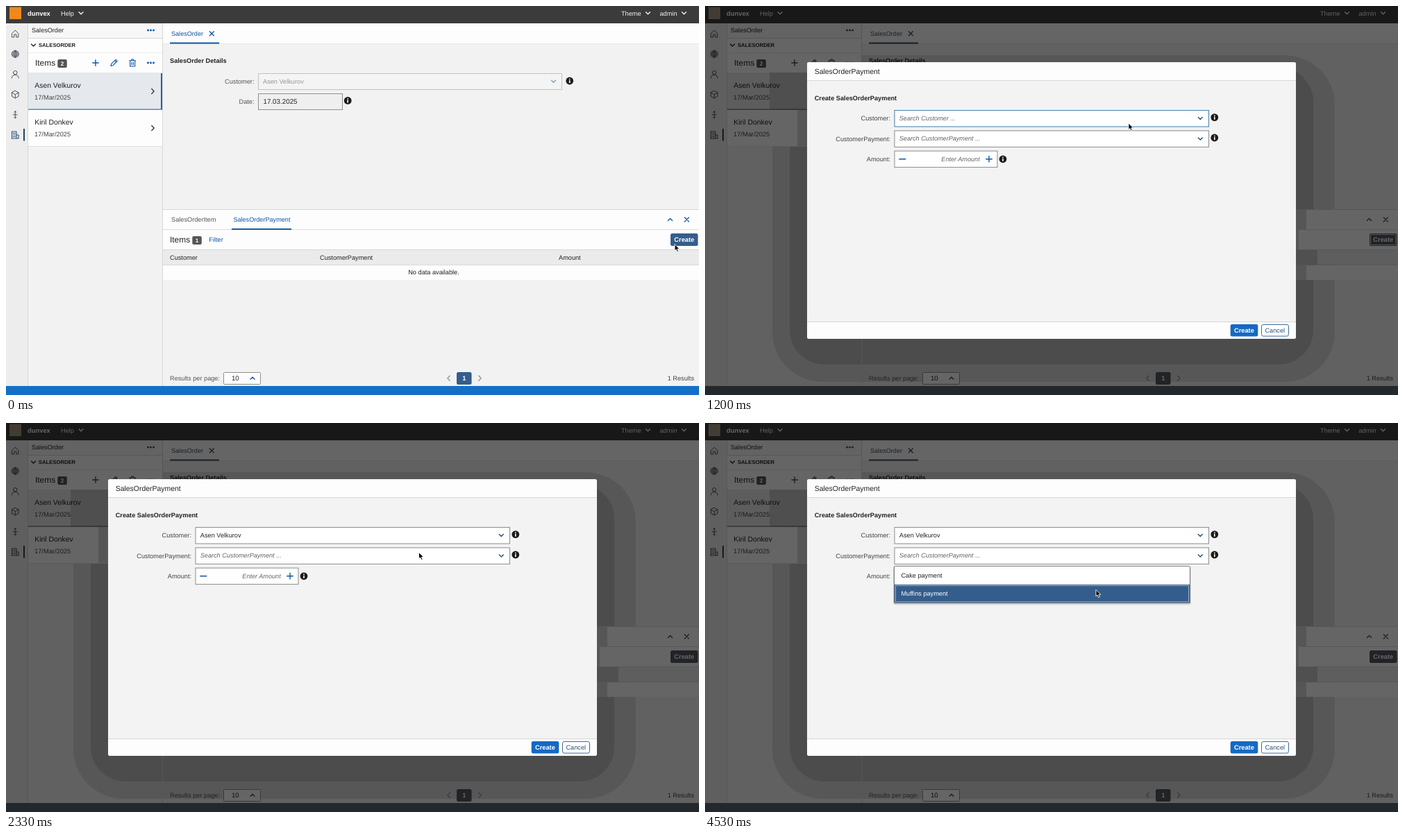
An HTML page for the animation above (4600 ms loop, 998 by 561 pixels).

```html
<!DOCTYPE html>
<html lang="en">
<head>
<meta charset="utf-8">
<title>Sales order payment</title>
<style>
html, body { margin: 0; width: 100%; height: 100%; overflow: hidden; background: #f2f2f2; }
svg { display: block; width: 100vw; height: 100vh; }
text { font-family: "Liberation Sans", Arial, sans-serif; font-size: 9.2px; text-rendering: geometricPrecision; white-space: pre; }
.dim { filter: grayscale(.85) brightness(.4); }
</style>
</head>
<body>
<svg id="stage" viewBox="0 0 998 561" xmlns="http://www.w3.org/2000/svg"></svg>
<script>
const PERSON = 'Asen Velkurov', OTHER = 'Kiril Donkev', DATE = '17/Mar/2025';
const BLUE = '#0f55a5', NAVY = '#355d8b', INK = '#222', WHITE = '#fdfdfd', LINE = '#d7d7d7';
const LOOP = 4600;

// Markup helpers
const rect = (x, y, w, h, fill, more = '') =>
  `<rect x="${x}" y="${y}" width="${w}" height="${h}" fill="${fill}" ${more}/>`;
const frame = (x, y, w, h, fill, stroke, more = '') =>
  rect(x + .5, y + .5, w - 1, h - 1, fill, `stroke="${stroke}" ${more}`);
const text = (x, y, s, fill = INK, size = 9.2, more = '') =>
  `<text x="${x}" y="${y}" fill="${fill}" style="font-size:${size}px" ${more}>${s}</text>`;
const bold = (x, y, s, fill, size, more = '') => text(x, y, s, fill, size, 'font-weight="700" ' + more);
const path = (d, color, w = 1.2, x = 0, y = 0) =>
  `<path d="${d}" transform="translate(${x} ${y})" fill="none" stroke="${color}" stroke-width="${w}" stroke-linecap="round" stroke-linejoin="round"/>`;
const group = (id, s, more = '') => `<g id="${id}" ${more}>${s}</g>`;
const END = 'text-anchor="end"', MID = 'text-anchor="middle"', ITALIC = 'font-style="italic"';

const down = (x, y, c, r = 3) => path(`M${-r} ${-r / 2}L0 ${r / 2}L${r} ${-r / 2}`, c, 1.4, x, y);
const up = (x, y, c, r = 3) => path(`M${-r} ${r / 2}L0 ${-r / 2}L${r} ${r / 2}`, c, 1.4, x, y);
const right = (x, y, c) => path('M-1.7 -3.5L1.7 0L-1.7 3.5', c, 1.3, x, y);
const left = (x, y, c) => path('M1.7 -3.5L-1.7 0L1.7 3.5', c, 1.3, x, y);
const cross = (x, y) => path('M-3 -3L3 3M3 -3L-3 3', BLUE, 1.3, x, y);
const plus = (x, y, r) => path(`M${-r} 0H${r}M0 ${-r}V${r}`, BLUE, 1.4, x, y);
const dots = (x, y) => [-4, 0, 4].map(d => `<circle cx="${x + d}" cy="${y}" r="1.45" fill="${BLUE}"/>`).join('');
const info = (x, y) => `<circle cx="${x}" cy="${y}" r="5.4" fill="#1c1c1c"/>` +
  rect(x - .8, y - .9, 1.6, 4, '#fff') + rect(x - .8, y - 3.3, 1.6, 1.5, '#fff');
const badge = (x, y, n) => rect(x, y, 13.5, 12, '#555', 'rx="2"') +
  bold(x + 6.7, y + 9, n, '#fff', 8.2, MID);

function topBar() {
  const c = '#f2f2f2';
  return rect(0, 0, 998, 25, '#3b3b3b') + rect(5, 1.5, 17, 17.5, '#ee8a1d') +
    bold(31, 13.5, 'dunvex', '#fff', 9.4) +
    text(79, 13.5, 'Help', c) + down(108, 10.3, c) +
    text(886, 13.5, 'Theme', c) + down(924.5, 10.3, c) +
    text(941.5, 13.5, 'admin', c) + down(976.5, 10.3, c);
}

function sideBar() {
  const c = '#475360';
  const icons = [
    'M-4.5 -.5L0 -5L4.5 -.5V5H1.5V1H-1.5V5H-4.5Z',
    'M-5 0A5 5 0 1 0 5 0A5 5 0 1 0 -5 0M-5 0H5M0 -5V5M-4.2 -2.5H4.2M-4.2 2.5H4.2M0 -5Q-5 0 0 5Q5 0 0 -5',
    'M-2.7 -2.3A2.7 2.7 0 1 0 2.7 -2.3A2.7 2.7 0 1 0 -2.7 -2.3M-5 5.5Q-4.5 1 0 1Q4.5 1 5 5.5',
    'M0 -5.3L4.8 -2.7V2.7L0 5.3L-4.8 2.7V-2.7ZM-4.8 -2.7L0 0L4.8 -2.7M0 0V5.3',
    'M0 -5V5M-1.6 -3.6L0 -5.2L1.6 -3.6M-1.6 3.6L0 5.2L1.6 3.6M-3 0H3'
  ];
  return rect(0, 25, 31, 523, '#ededed') + rect(31, 25, 1, 523, LINE) +
    icons.map((d, i) => path(d, c, 1, 13.3, 40 + i * 29.2)).join('') +
    path('M-4.5 5V-5H2V5M-5 5H5V0H2M-2.7 -2.5H.3M-2.7 0H.3M-2.7 2.5H.3', '#24507f', 1.1, 13, 186) +
    rect(25, 177, 2, 17.5, '#2b4157');
}

function listPanel() {
  const row = (y, name) => text(41.3, y, name, INK, 10.4) + text(41, y + 17.5, DATE, '#444', 9.3);
  return rect(32, 25, 193, 21, '#f7f7f7') + rect(32, 46, 193, 21, WHITE) +
    text(37, 38.3, 'SalesOrder', INK, 9.1) + dots(208.5, 35) +
    rect(32, 46, 193, 1, LINE) + rect(32, 67, 193, 29, WHITE) + rect(32, 67, 193, .7, '#e4e4e4') +
    down(39.5, 56.5, INK) + bold(47, 59.3, 'SALESORDER', INK, 7.65) +
    rect(32, 96, 193, 53, '#e5e8ec') + rect(32, 150, 193, 52, WHITE) + rect(32, 202, 193, 1, '#e0e0e0') +
    group('rowBands', rect(93, 96, 54, 53, '#000') + rect(133, 150, 14, 52, '#000'), 'opacity=".14"') +
    rect(32, 148.5, 193, 1.2, '#3f6fb0') + rect(223, 97, 2, 52, '#2d5f9f') +
    text(42, 86, 'Items', INK, 11.9) + badge(74.3, 77, 2) + plus(129, 82, 4.2) +
    path('M-4.5 4.5L-3.7 1.3L2.5 -4.7L4.7 -2.5L-1.5 3.7ZM1 -3.3L3.2 -1.1', BLUE, 1.1, 155.5, 82) +
    path('M-4.5 -3.2H4.5M-1.5 -3.2V-5H1.5V-3.2M-3.5 -3.2V5H3.5V-3.2M-1.2 -.8V2.8M1.2 -.8V2.8', BLUE, 1.1, 182.2, 82) +
    dots(208.5, 82) + row(117.6, PERSON) + right(211.5, 123, '#333') +
    row(170.8, OTHER) + right(211.5, 176, '#333') + rect(225, 25, 1, 523, LINE);
}

function details() {
  return rect(226, 25, 772, 29, WHITE) + rect(226, 54, 772, .7, '#e4e4e4') +
    text(238, 42.8, 'SalesOrder', BLUE, 9.1) + cross(296.3, 39.7) + rect(236, 52.5, 71, 2, BLUE) +
    bold(236, 82.3, 'SalesOrder Details') +
    text(357.5, 111.6, 'Customer:', '#555', 9.2, END) + frame(363, 97, 438, 24, '#f4f4f4', '#c2c2c2') +
    text(370, 111.8, PERSON, '#969696') + down(788.5, 108.7, '#7f9dbb') + info(811.7, 108) +
    text(357.5, 141, 'Date:', '#555', 9.2, END) + frame(363, 126, 122, 24, '#efefef', '#8f8f8f') +
    text(370.5, 141.3, '17.03.2025', INK, 9.8) + info(492.2, 136.4);
}

function payments() {
  return rect(226, 293, 772, 1, LINE) + rect(226, 294, 772, 57, WHITE) + rect(226, 322, 772, 1, '#dcdcdc') +
    rect(226, 351, 772, 22, '#ebebeb') + rect(226, 351, 772, .8, '#d4d4d4') +
    rect(226, 373, 772, .8, '#d4d4d4') + rect(226, 374, 772, 21, WHITE) +
    group('tableBands', rect(851, 294, 15, 28, '#000') + rect(851, 323, 4, 28, '#000') +
      rect(851, 352, 31, 21, '#000') + rect(851, 374, 15, 21, '#000'), 'opacity=".14"') +
    text(238, 311.2, 'SalesOrderItem', '#555') + text(327.4, 311.2, 'SalesOrderPayment', BLUE, 9.12) +
    rect(325, 320.8, 86, 2, BLUE) + up(956.5, 308, BLUE) + cross(980.3, 308) +
    text(236, 341.2, 'Items', INK, 11.9) + badge(268.3, 332, 1) + text(292.3, 340, 'Filter', BLUE) +
    rect(957, 328, 39.5, 18, NAVY, 'rx="2.5"') +
    group('focusRing', frame(958, 329, 37.5, 16, 'none', '#fff', 'rx="1.5" stroke-width=".8"')) +
    bold(976.8, 340.3, 'Create', '#fff', 9.3, MID) +
    text(236, 365.8, 'Customer') + text(452, 365.8, 'CustomerPayment') + text(796, 365.8, 'Amount') +
    text(616, 387, 'No data available.', INK, 9.2, MID) +
    text(236, 540, 'Results per page:', '#555') + frame(313, 528, 54, 18, WHITE, '#8f8f8f', 'rx="1"') +
    text(325, 540.2, '10', INK, 9.6) + up(355, 536.8, BLUE) +
    left(637.5, 536.8, '#8a94a0') + rect(649, 528, 21.5, 18, NAVY, 'rx="2.5"') +
    bold(659.8, 540.2, '1', '#fff', 9.3, MID) + right(682.5, 536.8, '#8a94a0') +
    text(991, 540, '1 Results', '#444', 9.2, END) + rect(0, 548, 998, 13, '#1470c6');
}

function page() {
  const shade = rect(97, 71, 810, 471, '#000', 'rx="72" opacity=".1"') +
    rect(122, 88, 754, 429, '#000', 'rx="50" opacity=".13"');
  return rect(0, 0, 998, 561, '#f2f2f2') + sideBar() + group('bands', shade) +
    listPanel() + details() + payments() + topBar();
}

function dialog() {
  const box = (id, x, y, w, h) => frame(x, y, w, h, '#fff', '#8c8c8c', `id="${id}"`);
  const label = (y, s) => text(267, y, s, '#444', 9.2, END);
  const hint = (id, x, y, s, more = '') => text(x, y, s, '#5f6468', 9.12, `id="${id}" ${ITALIC} ${more}`);
  return rect(147, 81, 704, 399, '#f3f3f3', 'rx="3"') +
    `<path d="M147 107V84a3 3 0 0 1 3-3H848a3 3 0 0 1 3 3V107Z" fill="${WHITE}"/>` + rect(147, 107, 704, 1, LINE) +
    `<path d="M147 456V477a3 3 0 0 0 3 3H848a3 3 0 0 0 3-3V456Z" fill="${WHITE}"/>` + rect(147, 455, 704, 1, LINE) +
    text(157.7, 98.2, 'SalesOrderPayment', INK, 10.45) + bold(157.7, 136, 'Create SalesOrderPayment') +
    label(165.2, 'Customer:') + box('buyerBox', 272.5, 150, 453.5, 24.5) + info(733.8, 160.6) +
    hint('buyerHint', 279.8, 165, 'Search Customer ...') + text(279.8, 165, PERSON, INK, 9.2, 'id="buyer"') +
    down(713.3, 162, '#24507f') +
    label(194.5, 'CustomerPayment:') + box('payBox', 272.5, 179.4, 453.5, 24.5) + info(733.8, 190) +
    hint('payHint', 279.8, 194.4, 'Search CustomerPayment ...') + down(713.3, 191.4, '#24507f') +
    label(223.8, 'Amount:') + box('sumBox', 272.5, 208.6, 149, 24.5) + info(429, 220.8) +
    path('M-4.5 0H4.5', BLUE, 1.4, 284.3, 220.7) + plus(409, 220.7, 4.3) +
    hint('sumHint', 395.7, 223.8, 'Enter Amount', END) +
    rect(279.5, 156.5, .9, 11, '#111', 'id="buyerCaret"') + rect(279.5, 186, .9, 11, '#111', 'id="payCaret"') +
    rect(756.7, 459, 39.6, 17.6, '#1569c4', 'rx="2.5"') + bold(776.4, 471.2, 'Create', '#fff', 9.3, MID) +
    frame(801, 459, 40, 17.6, '#fff', '#3d6a99', 'rx="2.5"') + text(820.8, 471.2, 'Cancel', '#24507f', 9.2, MID);
}

const option = (id, y, s) => rect(272.5, y, 426, 26.6, '#fff', `id="${id}Back"`) +
  group(id + 'Ring', frame(274, y + 1, 423, 24.4, 'none', '#a9c4e2', 'stroke-width=".8"')) +
  text(282.4, y + 16.2, s, INK, 9.2, `id="${id}Text"`);
const menu = (id, y, h, body) => group(id,
  rect(271, y, 429, h + 3, '#000', 'rx="3" opacity=".1"') + rect(271.5, y - .5, 427.5, h + 1.7, '#000', 'rx="2.5" opacity=".16"') +
  body + frame(272, y - .5, 427, h + .8, 'none', '#75797d', 'rx="2"'));

document.getElementById('stage').innerHTML = group('page', page()) +
  group('dialog', dialog() +
    menu('buyerMenu', 177, 26.6, option('person', 177, PERSON)) +
    menu('payMenu', 206.4, 53.2, option('cake', 206.4, 'Cake payment') + option('muffin', 233, 'Muffins payment'))) +
  '<path id="cursor" d="M0 0V9.4L2.1 7.5L3.6 11L5.4 10.2L3.9 6.9L6.8 6.8Z" fill="#000" stroke="#fff" stroke-width=".9" stroke-linejoin="round"/>';

const $ = id => document.getElementById(id);
const show = (id, on) => { $(id).style.display = on ? '' : 'none'; };
const within = (t, a, b) => t >= a && t < b;

// Pointer stops: time, x, y
const track = [
  [0, 963, 343.5], [400, 963, 343], [600, 938.5, 336], [850, 780, 252], [1200, 610, 169],
  [1400, 595, 163.5], [1670, 595, 163.5], [2050, 594.5, 186.5], [2670, 594.5, 186.5],
  [3130, 570, 209.5], [3470, 562.3, 229], [3990, 562.3, 229], [4130, 562.3, 232], [4350, 563, 240.5], [LOOP, 563, 240.5]
];

function pointer(t) {
  const i = Math.max(1, track.findIndex(p => t < p[0]));
  const [a, b] = [track[i - 1], track[i]];
  const u = (t - a[0]) / (b[0] - a[0]);
  return [1, 2].map(k => a[k] + (b[k] - a[k]) * u);
}

function paintOption(id, hover, pressed) {
  $(id + 'Back').setAttribute('fill', pressed ? NAVY : hover ? '#e5e5e5' : '#fff');
  $(id + 'Text').setAttribute('fill', pressed ? '#fff' : INK);
  show(id + 'Ring', pressed);
}

function update(t) {
  const open = t >= 600;
  const [x, y] = pointer(t);
  $('cursor').setAttribute('transform', `translate(${x.toFixed(2)} ${y.toFixed(2)})`);
  $('page').setAttribute('class', open ? 'dim' : '');
  show('dialog', open);
  ['bands', 'rowBands', 'tableBands'].forEach(id => show(id, open));
  show('focusRing', within(t, 600, 1400));

  const picking = within(t, 1400, 2200), paying = t >= 2670;
  const blink = start => (t - start) % 1000 < 500;
  show('buyerMenu', picking);
  show('buyerCaret', picking && blink(1400));
  show('buyerHint', t < 2200);
  show('buyer', t >= 2200);
  const over = open && x < 725 && y > 150 && y < 174;
  $('buyerBox').setAttribute('stroke', over ? '#3f7fae' : '#8c8c8c');
  paintOption('person', y > 177, t >= 2130);

  const pressed = t >= 4470;
  show('payMenu', paying);
  show('payCaret', paying && !pressed && blink(2670));
  paintOption('cake', y > 206.4 && y < 233, false);
  paintOption('muffin', y >= 233, pressed);
}

function tick(now) {
  update(now % LOOP);
  requestAnimationFrame(tick);
}
update(0);
requestAnimationFrame(tick);
</script>
</body>
</html>
```
